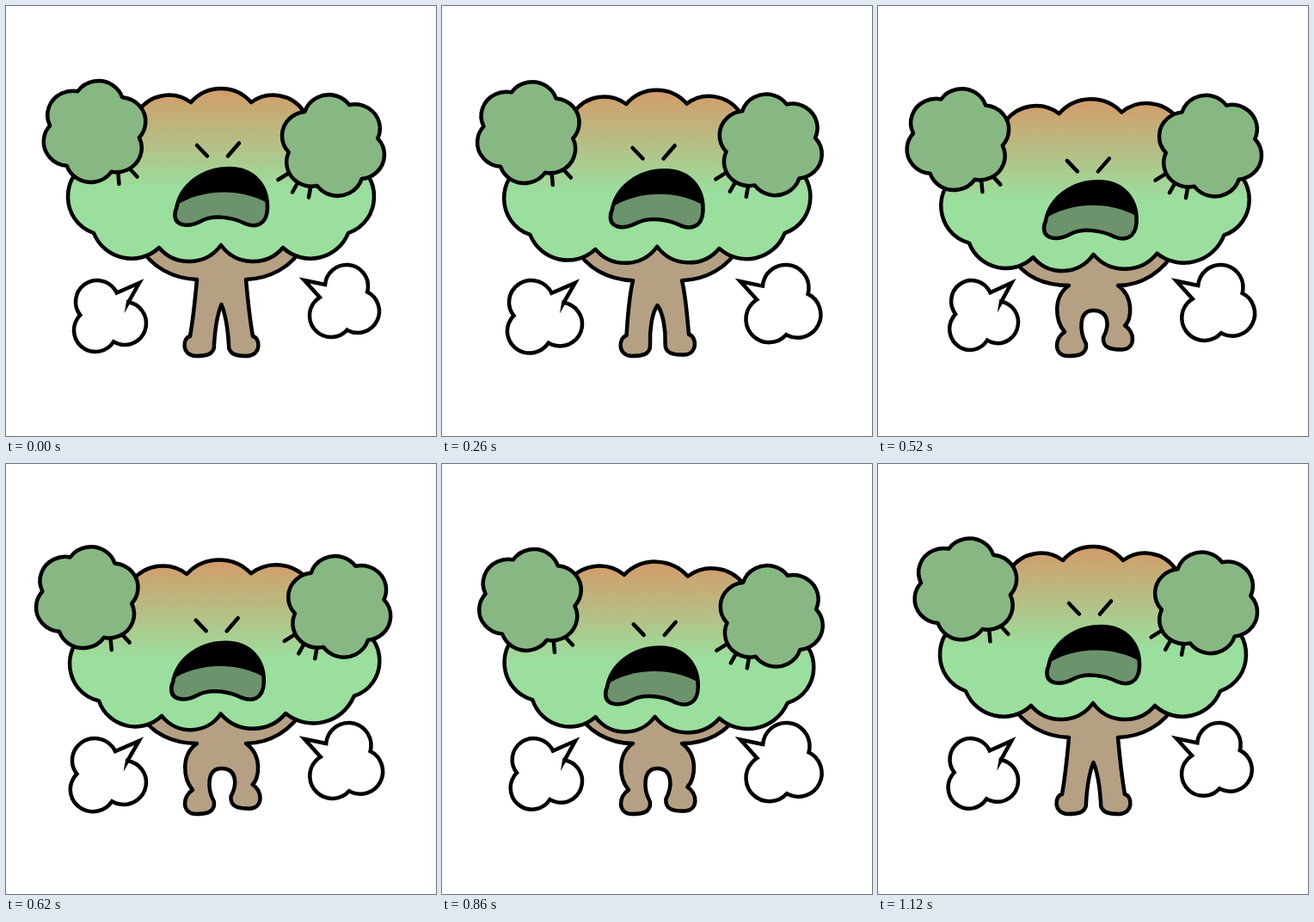
An HTML page with a canvas for the animation above (1140 ms loop, 500 by 500 pixels).

```html
<!DOCTYPE html>
<html lang="en">
<head>
<meta charset="utf-8">
<title>Angry tree</title>
<style>
html, body { margin: 0; width: 100%; height: 100%; overflow: hidden; background: #fff; }
canvas { display: block; width: 100vmin; height: 100vmin; }
</style>
</head>
<body>
<canvas id="stage" width="500" height="500"></canvas>
<script>
const ctx = document.getElementById('stage').getContext('2d');
const LOOP = 1140, STEP = 20, TAU = Math.PI * 2;

// Smooth 0 to 1 ramp between two times.
function ease(t, from, to) {
  const k = Math.min(1, Math.max(0, (t - from) / (to - from)));
  return (1 - Math.cos(Math.PI * k)) / 2;
}

// The tree crouches, rocks from its left to its right, then springs back up.
function poseAt(t) {
  const crouch = ease(t, 200, 420) * (1 - ease(t, 960, 1115));
  const rock = ease(t, 400, 960);
  const swell = Math.sin(Math.PI * rock);
  const blend = (start, end, middle = 0) => crouch * (start + (end - start) * rock + middle * swell);
  return {
    crouch,
    bow: 4 * crouch,
    widen: blend(2.5, 6, 5),
    top: { x: blend(-4, -1), y: blend(11, 18, 3.5), tilt: blend(-3, 3) },
    base: { x: blend(1, -3), y: blend(10, 16), tilt: blend(-4, 1.5) },
    eyes: [blend(-2.5, 1), blend(17, 25)],
    mouth: [blend(-3, -6.5), blend(13.5, 25, 1.5)],
    foot: blend(8, 3),
    leftHand: [blend(-6, 0), 12 * crouch],
    rightHand: [blend(0.5, 2.5, 1.5), blend(2, 16)]
  };
}

function ink(fill) {
  ctx.fillStyle = fill;
  ctx.fill();
  ctx.stroke();
}

function line(x1, y1, x2, y2) {
  ctx.beginPath();
  ctx.moveTo(x1, y1);
  ctx.lineTo(x2, y2);
  ctx.stroke();
}

function at(offset, paint) {
  ctx.save();
  ctx.translate(...offset);
  paint();
  ctx.restore();
}

function curves(pts) {
  for (let i = 0; i + 2 < pts.length; i += 3)
    ctx.bezierCurveTo(...pts[i], ...pts[i + 1], ...pts[i + 2]);
}

const mirror = (pts, axis) => pts.map(([x, y]) => [2 * axis - x, y]).reverse();

function drawBody({ crouch: c, base, foot }) {
  const leg = [[222, 318 + 7 * c],
    [220 - 17 * c, 340 - 2 * c], [218 - 12 * c, 362 + 4 * c], [214 + 3 * c, 384 - 5 * c],
    [205, 386], [204, 406], [220, 407],
    [232, 407], [243, 406], [242, 393],
    [243 - 9 * c, 378], [246 - 13 * c, 358 - 4 * c], [250.5, 347 + 7 * c]];
  const other = mirror(leg, 250.5).map(([x, y]) =>
    y > 372 ? [x + foot * 0.4, y - foot] : [x, y]);
  const drop = 8 * c, left = drop - base.tilt, right = drop + base.tilt;
  ctx.beginPath();
  ctx.moveTo(155, 278 + left);
  curves([[168, 304 + left], [195, 317 + drop], ...leg, ...other.slice(1),
    [306, 317 + drop], [333, 304 + right], [346, 278 + right]]);
  ctx.closePath();
  ink('#b5a083');
}

// Circular arc from a to b, bulging to the left of the direction of travel.
function scallop([ax, ay], [bx, by], bulge) {
  const dx = bx - ax, dy = by - ay, chord = Math.hypot(dx, dy);
  const along = (1 - (2 * bulge / chord) ** 2) / 3, out = 4 / 3 * bulge / chord;
  ctx.bezierCurveTo(
    ax + dx * along + dy * out, ay + dy * along - dx * out,
    bx - dx * along + dy * out, by - dy * along - dx * out, bx, by);
}

const CUSPS = [[285, 112], [346, 122], [400, 180], [398, 264], [322, 281], [250, 278]];
const BULGES = [13, 15, 29, 20.5, 17.5];
const HEAD = [...CUSPS, ...mirror(CUSPS, 250).slice(1)];
const HEAD_BULGES = [...BULGES, ...[...BULGES].reverse(), 16];

function drawHead({ top, base, widen, bow }) {
  const warp = ([x, y]) => {
    const v = (y - 96) / 201, u = 1 - v, h = (x - 250) / 105;
    const side = Math.min(1, h * h);
    return [
      x + (top.x + widen * h) * u * u + (base.x + widen * side) * v,
      y + (top.y + top.tilt * h) * u + (base.y + base.tilt * h) * v - bow * side
    ];
  };
  const pts = HEAD.map(warp);
  const shade = ctx.createLinearGradient(0, 100 + top.y, 0, 215 + top.y * 0.8);
  shade.addColorStop(0, '#d19e6b');
  shade.addColorStop(1, '#9adf9e');
  ctx.beginPath();
  ctx.moveTo(...pts[0]);
  pts.forEach((p, i) => scallop(p, pts[(i + 1) % pts.length], HEAD_BULGES[i]));
  ctx.closePath();
  ink(shade);
}

const MOUTH = new Path2D('M198 236C203 207 230 189 260 189C289 189 305 210 304 236' +
  'C303 255 290 258 278 253C264 246 242 242 227 250C212 258 193 257 197 238Z');
const TONGUE = new Path2D('M192 236C222 212 276 209 310 233V262H192Z');

function drawFace({ eyes, mouth }) {
  at(eyes, () => {
    line(222, 162, 234, 174.5);
    line(271, 159.5, 258, 174.5);
  });
  at(mouth, () => {
    ctx.fillStyle = '#000';
    ctx.fill(MOUTH);
    ctx.save();
    ctx.clip(MOUTH);
    ctx.fillStyle = '#6c936c';
    ctx.fill(TONGUE);
    ctx.restore();
    ctx.stroke(MOUTH);
  });
}

// Outer crossing of two equal circles, taken clockwise.
function crossing([ax, ay], [bx, by], r) {
  const dx = bx - ax, dy = by - ay, d = Math.hypot(dx, dy);
  const k = Math.sqrt(r * r - d * d / 4) / d;
  return [(ax + bx) / 2 + dy * k, (ay + by) / 2 - dx * k];
}

// Outline of a clockwise chain of overlapping circles between two points.
function cloud(circles, r, entry, exit) {
  circles.forEach((c, i) => {
    const from = i ? crossing(circles[i - 1], c, r) : entry;
    const to = i < circles.length - 1 ? crossing(c, circles[i + 1], r) : exit;
    const angle = p => Math.atan2(p[1] - c[1], p[0] - c[0]);
    ctx.arc(...c, r, angle(from), angle(to));
  });
  ctx.closePath();
}

function pompom(x, y, turn) {
  const reach = 31.7, r = 28.7;
  const ring = Array.from({ length: 6 }, (_, i) => {
    const a = turn + TAU * (i + 0.5) / 6;
    return [reach * Math.cos(a), reach * Math.sin(a)];
  });
  const seam = crossing(ring[5], ring[0], r);
  ctx.save();
  ctx.translate(x, y);
  ctx.scale(1.02, 0.98);
  ctx.beginPath();
  cloud(ring, r, seam, seam);
  ctx.restore();
  ink('#87b883');
}

function drawHands({ leftHand, rightHand }, t) {
  const shake = 3 * (1 - Math.cos(TAU * 8 * t / LOOP));
  at([leftHand[0] - shake, leftHand[1] - shake * 0.6], () => {
    line(130, 190, 131.5, 207);
    line(140, 185, 152.5, 198.5);
    pompom(103, 146, 0.14);
  });
  at([rightHand[0] + shake, rightHand[1] - shake * 0.6], () => {
    line(334, 191, 316.5, 202);
    line(343, 199, 333, 216.5);
    line(355, 206, 352, 222.5);
    pompom(380.5, 162, -0.16);
  });
}

// A steam puff with a pointed tail, stretched about an anchor.
function puff(tip, entry, circles, exit, [x, y], sx, sy) {
  ctx.save();
  ctx.translate(x, y);
  ctx.scale(sx, sy);
  ctx.translate(-x, -y);
  ctx.beginPath();
  ctx.moveTo(...tip);
  ctx.lineTo(...entry);
  cloud(circles, 25, entry, exit);
  ctx.restore();
  ink('#fff');
}

function drawPuffs(t) {
  const phase = TAU * 6 * t / LOOP;
  const sway = 0.025 * Math.sin(phase), grow = 1 + 0.044 * (1 - Math.cos(phase));
  ctx.lineJoin = 'miter';
  puff([155, 322], [142, 345], [[138, 369], [104, 377], [106, 344]], [130, 333],
    [163, 318], 1 + 2 * sway, 1 + sway);
  puff([347, 319], [371, 324], [[396, 326], [409, 355], [378, 360]], [365, 339],
    [347, 302], grow, grow);
}

function draw(t) {
  const pose = poseAt(t);
  ctx.fillStyle = '#fff';
  ctx.fillRect(0, 0, 500, 500);
  ctx.strokeStyle = '#000';
  ctx.lineWidth = 4.5;
  ctx.lineCap = ctx.lineJoin = 'round';
  drawBody(pose);
  drawHead(pose);
  drawFace(pose);
  drawHands(pose, t);
  drawPuffs(t);
}

const start = performance.now();
function tick() {
  const elapsed = (performance.now() - start) % LOOP;
  draw(Math.floor(elapsed / STEP) * STEP);
  requestAnimationFrame(tick);
}
tick();
</script>
</body>
</html>
```
